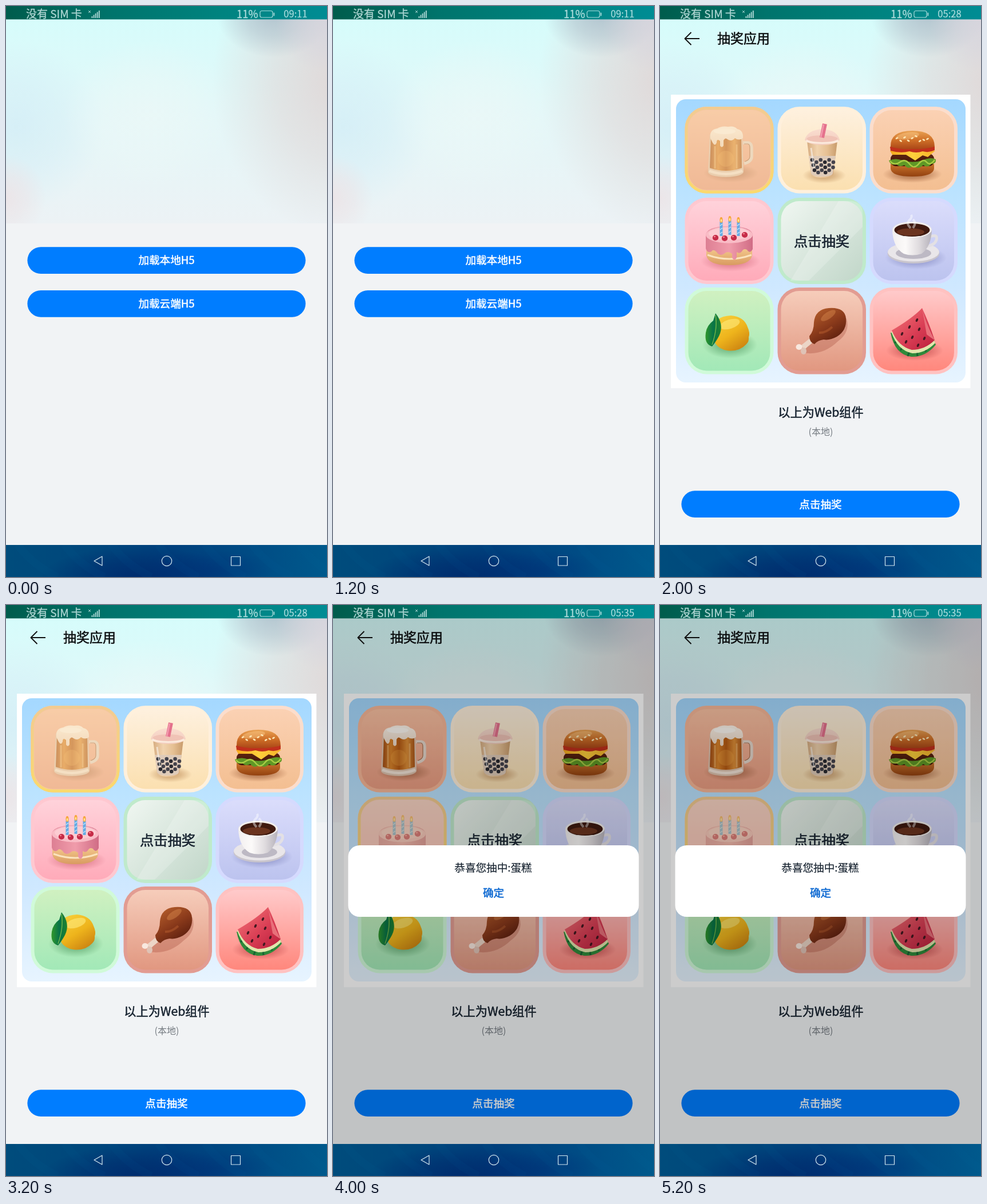
An HTML page with a canvas for the animation above (6000 ms loop, 561 by 998 pixels).

```html
<!DOCTYPE html>
<html lang="zh-CN">
<head>
<meta charset="utf-8">
<title>抽奖应用</title>
<style>
html, body { margin: 0; width: 100%; height: 100%; overflow: hidden; background: #f1f3f5; }
canvas { display: block; width: 561px; height: 998px; }
</style>
</head>
<body>
<canvas id="stage" width="561" height="998"></canvas>
<script>
const ctx = document.getElementById('stage').getContext('2d');
const FONT = '"Noto Sans CJK SC", "Noto Sans CJK", "Noto Sans", sans-serif';
const SCENE_MS = 2000;
const SCENES = [
  { clock: '09:11', draw: drawHome },
  { clock: '05:28', draw: () => drawLottery(0) },
  { clock: '05:35', draw: drawResult }
];

function linear(x0, y0, x1, y1, ...colors) {
  const g = ctx.createLinearGradient(x0, y0, x1, y1);
  colors.forEach((c, i) => g.addColorStop(i / (colors.length - 1), c));
  return g;
}

function rect(x, y, w, h, fill) {
  ctx.fillStyle = fill;
  ctx.fillRect(x, y, w, h);
}

function round(x, y, w, h, r, fill) {
  ctx.beginPath();
  ctx.roundRect(x, y, w, h, r);
  ctx.fillStyle = fill;
  ctx.fill();
}

function oval(x, y, rx, ry, fill, angle = 0) {
  ctx.beginPath();
  ctx.ellipse(x, y, rx, ry, angle, 0, Math.PI * 2);
  ctx.fillStyle = fill;
  ctx.fill();
}

function shape(d, fill) {
  ctx.fillStyle = fill;
  ctx.fill(new Path2D(d));
}

function line(d, color, width) {
  ctx.strokeStyle = color;
  ctx.lineWidth = width;
  ctx.stroke(new Path2D(d));
}

// Soft round patch; rgb is "r,g,b"
function glow(x, y, rx, ry, rgb, alpha) {
  ctx.save();
  ctx.translate(x, y);
  ctx.scale(rx, ry);
  const g = ctx.createRadialGradient(0, 0, 0, 0, 0, 1);
  g.addColorStop(0, `rgba(${rgb},${alpha})`);
  g.addColorStop(0.5, `rgba(${rgb},${alpha * 0.6})`);
  g.addColorStop(1, `rgba(${rgb},0)`);
  rect(-1, -1, 2, 2, g);
  ctx.restore();
}

// y is the middle of the text line; bold is the extra stem width
function text(s, x, y, size, color, bold = 0, align = 'center') {
  ctx.font = `${size}px ${FONT}`;
  ctx.textAlign = align;
  ctx.fillStyle = color;
  ctx.fillText(s, x, y + size * 0.38);
  if (!bold) return;
  ctx.strokeStyle = color;
  ctx.lineWidth = bold;
  ctx.lineJoin = 'round';
  ctx.strokeText(s, x, y + size * 0.38);
}

function clipped(x, y, w, h, draw) {
  ctx.save();
  ctx.beginPath();
  ctx.rect(x, y, w, h);
  ctx.clip();
  draw();
  ctx.restore();
}

function drawBackdrop() {
  rect(0, 0, 561, 998, '#f1f3f5');
  clipped(0, 23, 561, 357, () => {
    rect(0, 23, 561, 357, linear(0, 23, 0, 380, '#d6fcfb', '#e4f7f8', '#ecf2f5'));
    glow(20, 210, 150, 150, '208,236,246', 0.7);
    glow(250, 190, 150, 130, '236,248,247', 0.7);
    glow(580, 130, 220, 270, '224,216,216', 1);
    glow(0, 335, 70, 75, '236,228,231', 0.9);
    glow(468, 15, 100, 75, '172,190,202', 0.85);
    glow(561, 30, 90, 85, '214,210,220', 0.8);
  });
}

function drawStatusBar(clock) {
  const pale = 'rgba(225,245,245,.75)';
  rect(0, 0, 561, 23.4, linear(0, 0, 561, 0, '#005c4c', '#00746c', '#00837f', '#008c94'));
  text('没有 SIM 卡', 35, 13.5, 19, pale, 0.3, 'left');
  line('M144 8l4 4m0-4l-4 4', pale, 1);
  for (let i = 0; i < 5; i++) {
    const h = 3 + i * 2.5;
    rect(149.5 + i * 3.1, 21 - h, 1.9, h, pale);
  }
  text('11%', 440.5, 13.5, 18.5, pale, 0.3, 'right');
  ctx.beginPath();
  ctx.roundRect(444, 8.5, 22, 11.5, 3);
  ctx.strokeStyle = pale;
  ctx.lineWidth = 1.2;
  ctx.stroke();
  round(467.5, 11.5, 1.8, 6, 1, pale);
  text(clock, 506, 14, 16.6, pale, 0.2);
}

function drawNavBar() {
  clipped(0, 942, 561, 56, () => {
    rect(0, 942, 561, 56, linear(0, 942, 561, 965, '#004c7c', '#00477c', '#003f7c', '#004b84', '#00598c'));
    glow(230, 1000, 170, 55, '0,38,106', 0.8);
    glow(360, 985, 110, 35, '0,48,120', 0.5);
    for (let i = 0; i < 7; i++) {
      const x = 20 + i * 82;
      line(`M${x} 941q25 35 70 57`, 'rgba(0,105,155,.07)', 14);
    }
  });
  const pale = '#d6e8f1';
  line('M154 970L168 962V978Z', pale, 1.2);
  line('M289.7 970a8.7 8.7 0 1 1-17.4 0a8.7 8.7 0 1 1 17.4 0', pale, 1.2);
  line('M393.5 962.5H409.5V978H393.5Z', pale, 1.2);
}

function drawButton(y, label) {
  round(37.4, y, 486.2, 46.8, 23.4, '#007dff');
  text(label, 280.5, y + 23.2, 18.6, '#fff', 0.5);
}

function drawHome() {
  drawButton(421.2, '加载本地H5');
  drawButton(496.9, '加载云端H5');
}

function beer() {
  glow(124, 292, 48, 16, '120,60,25', 0.5);
  line('M145 239H154Q160 240 160 248V263Q160 272 147 275', '#e6d8cd', 5.5);
  line('M147 241H153Q157 241 157 248V263Q157 269 148 272', '#a9704f', 1.2);
  shape('M87 224L84 290Q85 298 115 299Q144 298 146 290L144 224Z', '#dfc4af');
  shape('M89 228L87 283Q115 293 143 283L142 228Z', linear(87, 0, 144, 0, '#a54f16', '#dc852b', '#b65a13', '#e09038', '#a85216'));
  line('M96 245V284M134 242V284', 'rgba(245,190,120,.55)', 3);
  oval(115, 267, 14, 14, 'rgba(255,185,80,.25)');
  shape('M88 231Q86 216 100 214Q108 209 119 211Q130 209 135 215Q146 217 145 231Q138 236 131 231Q125 238 118 233Q114 229 111 235V244Q108 249 105 244V236Q99 231 99 239Q96 246 92 239Z', linear(0, 211, 0, 248, '#fff6ec', '#f0dac6'));
  oval(113, 219, 19, 5, '#fffaf3');
  line('M86 288Q115 299 144 288', '#f3e5d8', 5);
}

function milkTea() {
  glow(287, 296, 38, 14, '165,105,50', 0.55);
  shape('M257 236L264 293Q265 300 284 300Q302 300 303 293L310 236Z', linear(257, 0, 310, 0, '#d6ac80', '#f1d3ae', '#e6c093', '#c89b6b'));
  shape('M260 262L264 292Q266 298 284 298Q301 298 302 292L307 262Z', '#dfcbb9');
  for (let i = 0; i < 17; i++) {
    const row = Math.floor(i / 6);
    const x = 266 + (i % 6) * (7.4 - row * 0.5) + row * 2;
    oval(x, 269 + row * 9 + (i % 2) * 4, 3.3, 3.3, i % 3 ? '#45434c' : '#2b2a31');
  }
  shape('M253 234Q257 217 284 215Q310 217 314 234Q306 243 284 243Q261 243 253 234Z', linear(0, 215, 0, 243, '#f9dccf', '#f3cdbd'));
  oval(283.5, 236, 29, 5, '#fbeadd');
  oval(283.5, 232, 27, 6, '#f0c3b6');
  line('M288 206L283 230', '#e4718c', 8);
  line('M286 207L281 230', '#f39aae', 2.5);
  line('M264 248L269 283', 'rgba(255,255,255,.5)', 3);
}

function burger() {
  glow(441, 294, 52, 15, '120,50,15', 0.6);
  shape('M403 276H479V284Q478 298 441 298Q404 298 403 284Z', linear(0, 276, 0, 298, '#c9732d', '#93410f'));
  round(403, 258, 76, 22, 9, linear(0, 258, 0, 280, '#5f2410', '#3c140a'));
  shape('M400 270Q412 265 424 270Q442 275 458 270Q474 263 482 268Q483 276 474 276Q468 284 460 278Q451 287 443 279Q434 287 427 278Q418 283 413 276Q403 280 400 270Z', '#5f9826');
  line('M402 271Q410 280 419 273T436 276T452 276T466 273T480 269', '#a9cc45', 2.5);
  shape('M402 253H481L468 264L459 261L446 270L430 260H406Z', linear(402, 0, 481, 0, '#f7a91d', '#ffd03c', '#f5b32a'));
  shape('M402 246H480V252Q470 257 459 254Q448 258 436 254Q421 258 403 253Z', '#c0301c');
  shape('M403 246Q402 218 441 218Q480 218 480 246Q460 251 441 250Q418 251 403 246Z', linear(0, 218, 0, 251, '#e9a254', '#cf7028', '#a94516'));
  oval(433, 227, 20, 6, 'rgba(255,210,145,.4)', -0.15);
  for (let i = 0; i < 9; i++) {
    oval(414 + i * 6.7, 231 + (i * 7 % 11) - Math.sin(i * 0.4) * 6, 2.6, 1.4, '#ffe8b7', i % 2 ? 0.5 : -0.5);
  }
}

function cake() {
  glow(123, 446, 52, 18, '190,70,90', 0.55);
  shape('M81 408V436Q84 453 121 453Q158 453 161 436V408Z', linear(0, 425, 0, 454, '#f2c68a', '#d8995f'));
  line('M83 435Q121 449 160 435', '#fbe3bd', 3);
  shape('M80 402Q80 385 121 385Q162 385 162 402V425Q157 434 152 426Q146 423 143 429Q139 434 134 430V440Q130 447 126 440V433Q118 427 112 433Q104 438 99 430Q93 424 90 429Q83 433 80 424Z', linear(80, 0, 162, 0, '#dd7f93', '#f09cab', '#d06c85'));
  oval(121, 400, 41, 14.5, '#f9bcc6');
  oval(121, 398, 36, 11, '#fcccd2');
  [107, 122, 137].forEach((x, i) => {
    const y = i === 1 ? 375 : 377;
    rect(x - 2.5, y, 5, 25, '#64abe4');
    line(`M${x - 2} ${y + 7}l4-3m-4 10l4-3m-4 10l4-3`, '#c5e6fb', 1.5);
    oval(x, y - 3, 2.5, 5, '#f6a53b');
    oval(x, y - 2, 1.1, 2.7, '#fff2a0');
  });
  [[97, 405], [113, 406], [129, 405], [148, 400]].forEach(([x, y]) => {
    oval(x, y, 5.2, 5, '#c62c48');
    oval(x - 1.5, y - 2, 1.5, 1.2, '#f68b95');
  });
}

function coffee() {
  glow(447, 440, 54, 20, '95,100,165', 0.6);
  oval(443, 432, 45.5, 18, '#c9c5cd');
  oval(443, 430, 45, 16.5, '#e9e6e9');
  oval(443, 432, 31, 10, '#bdb9c4');
  line('M472 403Q486 398 483 409Q480 418 466 420', '#e3e0e4', 5);
  shape('M406 391Q407 422 426 433Q441 438 457 433Q474 421 475 391Z', linear(406, 0, 475, 0, '#f2efef', '#fcfaf9', '#e0dcdf', '#b5b1ba'));
  oval(440.5, 391, 34.5, 14, '#f1eeec');
  oval(440.5, 391.5, 31, 11.5, '#3f1a10');
  oval(438, 395, 24, 6.5, '#6b341f');
  line('M438 388Q429 380 437 373Q441 369 439 365M442 388Q449 379 442 373', 'rgba(255,255,255,.45)', 4);
}

function lemon() {
  glow(122, 592, 48, 24, '50,130,70', 0.6);
  shape('M91 568Q94 542 124 541Q147 543 153 561Q158 572 155 579Q156 586 151 591Q138 605 117 602Q92 598 91 568Z', linear(100, 545, 140, 606, '#f8cf3a', '#eeb41c', '#c97f10'));
  oval(122, 556, 18, 8, 'rgba(255,236,125,.6)', -0.3);
  shape('M97 537Q113 557 103 577Q97 588 91 595Q77 591 80 571Q82 558 93 550Z', linear(80, 0, 106, 0, '#2f962c', '#087448', '#1e812f'));
  line('M97 540Q101 563 91 592', '#6fb348', 1.5);
}

function drumstick() {
  shape('M250 606Q284 612 311 586Q333 570 326 546L269 580Z', 'rgba(145,45,30,.25)');
  line('M270 580L249 597', '#ecd5c7', 9);
  oval(243, 596, 5.5, 5, '#f8e8df');
  oval(251, 603, 5, 6, '#dfc3b6');
  shape('M261 577Q269 568 269 553Q271 530 295 528Q323 526 325 546Q327 567 309 578Q296 585 286 583Q276 584 270 591Q261 588 261 577Z', linear(278, 530, 312, 585, '#b05a2a', '#8a3a1b', '#5a1d0e'));
  oval(294, 541, 15, 6, 'rgba(224,146,82,.4)', -0.6);
  line('M278 571Q289 572 301 561', 'rgba(205,112,57,.35)', 4);
}

function watermelon() {
  glow(445, 602, 50, 18, '165,40,45', 0.6);
  shape('M403 571Q410 609 439 613Q464 614 482 592L477 580Z', '#2f8a3b');
  line('M410 589l5-4m5 17l5-7m8 17l3-9m14 9l-1-9m16 1l-3-7', '#176333', 3);
  shape('M404 569Q415 602 441 607Q464 607 481 589L474 574Z', '#e2e6ad');
  shape('M458 528Q441 546 405 567Q416 595 440 601Q463 601 480 584Q469 551 458 528Z', linear(420, 545, 470, 600, '#ea626b', '#d93d54', '#bf2440'));
  shape('M458 528Q463 551 480 584Q471 578 466 574Z', '#e8707a');
  [[449, 549], [436, 561], [453, 565], [423, 573], [441, 579], [462, 581], [430, 587], [451, 593]]
    .forEach(([x, y]) => oval(x, y, 1.9, 3.2, '#431921', 0.4));
}

// Grid position, border, inner top, inner bottom, icon
const TILES = [
  [0, 0, '#f7b898', '#fbc3a4', '#ea9b80', beer],
  [1, 0, '#fff0dc', '#fef1e0', '#fbdfae', milkTea],
  [2, 0, '#fbddcc', '#fbd2b5', '#f3be90', burger],
  [0, 1, '#ffc8d0', '#ffd4dc', '#ffa9b8', cake],
  [1, 1, '#bfeacb', '#f2f8f3', '#bfd5c7', drawLabel],
  [2, 1, '#d5dafe', '#dcdefc', '#bbc2ee', coffee],
  [0, 2, '#d0fad9', '#d2f1c1', '#a0e8b7', lemon],
  [1, 2, '#e29c92', '#f7cfbd', '#e0957e', drumstick],
  [2, 2, '#ffc2c1', '#ffcdce', '#ff8479', watermelon]
];
const COLUMNS = [[43.5, 155], [205.5, 154.5], [366.5, 153.5]];
const ROWS = [[176, 151.5], [335, 151], [492, 151.5]];

function drawLabel() {
  shape('M312 341H334Q354 343 354 361V386L260 480H228Z', 'rgba(255,255,255,.2)');
  text('点击抽奖', 282.5, 411, 24.3, '#182431', 0.6);
}

function drawTile([col, row, border, top, bottom, icon], chosen) {
  const [x, w] = COLUMNS[col];
  const [y, h] = ROWS[row];
  const slant = icon === drawLabel ? x + w : x;
  round(x, y, w, h, 38, border);
  round(x + 6, y + 6, w - 12, h - 12, 32, linear(x, y, slant, y + h, top, bottom));
  icon();
  if (!chosen) return;
  round(x, y, w, h, 38, 'rgba(244,216,172,.48)');
  ctx.beginPath();
  ctx.roundRect(x + 2.5, y + 2.5, w - 5, h - 5, 35.5);
  ctx.strokeStyle = linear(0, y, 0, y + h, '#f2cb92', '#fad96c');
  ctx.lineWidth = 5;
  ctx.stroke();
}

function drawLottery(chosen) {
  line('M69 57H44M54.5 46L43.5 57L54.5 68', '#111', 1.9);
  text('抽奖应用', 100, 56, 23, '#0b0d0f', 0.5, 'left');
  rect(19, 155, 523.5, 513, '#fff');
  round(28, 163, 506, 495, 17, linear(0, 163, 0, 658, '#a4d8ff', '#bbe3ff', '#cfe8ff', '#e7f4ff'));
  TILES.forEach((tile, i) => drawTile(tile, i === chosen));
  text('以上为Web组件', 281, 710, 21.2, '#182431', 0.55);
  text('(本地)', 281, 744, 16, '#747a80');
  drawButton(847.3, '点击抽奖');
}

function drawResult() {
  drawLottery(3);
  rect(0, 23, 561, 919, 'rgba(0,0,0,.2)');
  round(26.5, 420, 508, 125, 20, '#fff');
  text('恭喜您抽中:蛋糕', 280, 458.5, 18.6, '#182431', 0.2);
  text('确定', 280.5, 502.5, 18.6, '#0a67d1', 0.5);
}

function render(now) {
  const scene = SCENES[Math.floor(now / SCENE_MS) % SCENES.length];
  drawBackdrop();
  scene.draw();
  drawStatusBar(scene.clock);
  drawNavBar();
}

const start = performance.now();
function tick() {
  render(performance.now() - start);
  requestAnimationFrame(tick);
}
tick();
</script>
</body>
</html>
```
